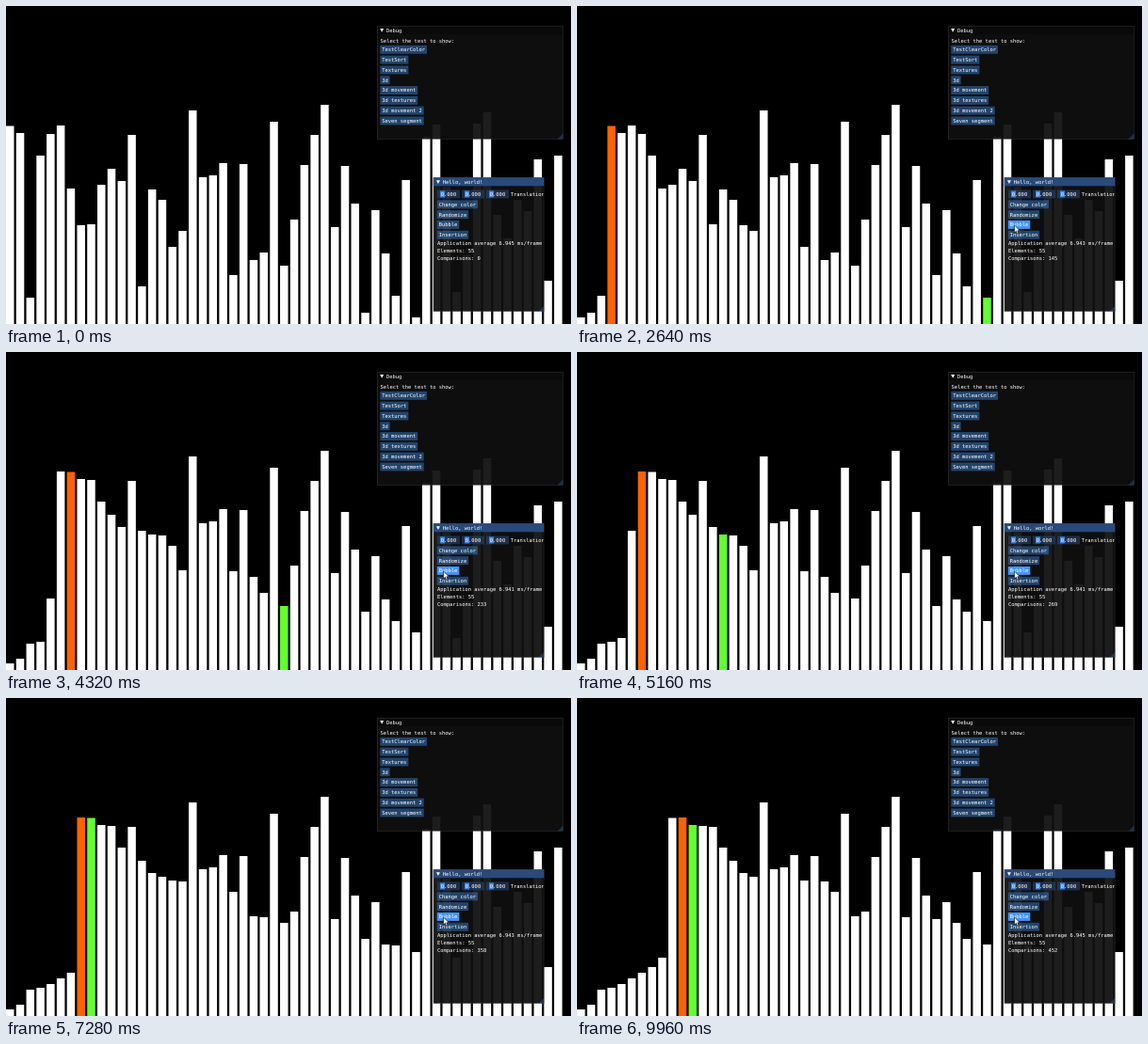
Recreate the animation shown at these times as an HTML page. Size 600 by 338 pixels, loop 10000 ms.

```html
<!DOCTYPE html>
<html lang="en">
<head>
<meta charset="utf-8">
<title>Sort visualiser</title>
<style>
  html, body { margin: 0; width: 100%; height: 100%; overflow: hidden; background: #000; }
  svg { display: block; width: 600px; height: 338px; }
  text {
    font: 5.45px "DejaVu Sans Mono", "Liberation Mono", monospace;
    fill: #fff; white-space: pre; text-rendering: geometricPrecision;
  }
</style>
</head>
<body>
<svg id="stage" viewBox="0 0 600 338">
  <defs><clipPath id="clip"><rect x="454" y="182" width="116.5" height="142"/></clipPath></defs>
  <g id="bars"></g>
  <g id="frames"></g>
  <g id="debug"></g>
  <g id="panel" clip-path="url(#clip)"></g>
  <path id="cursor" d="M0 0V8L1.9 6.3L3.1 9.2L4.5 8.6L3.3 5.8H5.8Z" fill="#fff" stroke="#000" stroke-width=".6"/>
</svg>
<script>
const LOOP = 10000, FLOOR = 338, PITCH = 10.78, BAR = 8.5;
const CHAR = 3.28, ROW = 10.8, LINE = 8;
const WHITE = '#fff', ORANGE = '#ff6200', GREEN = '#62ff2e', BLUE = '#4296fa', NAVY = '#294a7a';
const SWAP_TIME = 65, PASS_TIME = 30, SORT_START = 1125;

// The unsorted input: top edge of each bar
const tops = [
  127.5, 135, 310, 159, 136, 127, 194, 233, 232, 190, 173, 186, 137, 298, 195, 206, 256, 239,
  111, 182, 180, 167, 286, 168, 270, 262, 123, 276, 227, 169, 137, 105, 235, 170, 210, 326,
  217, 263, 308, 185, 331, 139, 126, 192, 304, 265, 125, 113, 222, 247, 206, 218, 163, 292, 159
];

const $ = id => document.getElementById(id);

function add(parent, tag, attrs, content) {
  const el = document.createElementNS('http://www.w3.org/2000/svg', tag);
  for (const k in attrs) el.setAttribute(k, attrs[k]);
  if (content) el.textContent = content;
  parent.appendChild(el);
  return el;
}

const rect = (g, x, y, width, height, fill, opacity = 1) =>
  add(g, 'rect', { x, y, width, height, fill, 'fill-opacity': opacity });

// Text placed by the middle of its line
const label = (g, x, mid, s) => add(g, 'text', { x, y: mid + 1.9 }, s);

function button(g, x, mid, s) {
  const box = rect(g, x, mid - 4.4, s.length * CHAR + 3.8, 8.9, BLUE, .4);
  label(g, x + 1.9, mid, s);
  return { box, mid };
}

const buttonColumn = (g, x, mid, names) => names.map((s, i) => button(g, x, mid + i * ROW, s));

function windowFrame(x, y, w, h, title, titleFill) {
  const g = $('frames');
  rect(g, x, y, w, h, '#0f0f0f', .94);
  rect(g, x, y, w, 9, titleFill);
  add(g, 'path', { d: `M${x + 3.2} ${y + 3}h3.9l-1.95 3.7z`, fill: WHITE });
  label(g, x + 10, y + 4.8, title);
  add(g, 'path', { d: `M${x + w} ${y + h}v-6l-6 6z`, fill: BLUE, 'fill-opacity': .25 });
  add(g, 'rect', {
    x: x + .25, y: y + .25, width: w - .5, height: h - .5,
    fill: 'none', stroke: '#6e6e80', 'stroke-opacity': .4, 'stroke-width': .5
  });
}

const bars = tops.map((y, i) => rect($('bars'), i * PITCH, y, BAR, FLOOR - y, WHITE));

const debug = $('debug');
windowFrame(394, 21, 197.5, 120.5, 'Debug', '#0a0a0a');
label(debug, 397.6, 37, 'Select the test to show:');
buttonColumn(debug, 397.3, 46.3, [
  'TestClearColor', 'TestSort', 'Textures', '3d', '3d movement', '3d textures', '3d movement 2', 'Seven segment'
]);

const panel = $('panel');
windowFrame(453.8, 182.3, 117.5, 142.4, 'Hello, world!', NAVY);
for (let i = 0; i < 3; i++) {
  const x = 458 + i * 26;
  rect(panel, x, 195.5, 24, 8.9, NAVY, .54);
  rect(panel, x + 3, 196.4, 5, 7, '#3d85e0');
  label(panel, x + 3.8, 200, '0.000');
}
label(panel, 535.8, 200, 'Translation');
const buttons = buttonColumn(panel, 457.8, 210.8, ['Change color', 'Randomize', 'Bubble', 'Insertion']);
const [average, , counter] = [' ', 'Elements: ' + tops.length, ' ']
  .map((s, i) => label(panel, 458, 252.5 + i * LINE, s));

// Exchange sort: the picture pauses only before each swap.
function record() {
  const a = [...tops], steps = [{ t: 0, a: [...a], start: -1, probe: -1, count: 0 }];
  let count = 0, t = SORT_START;
  for (let i = 0; t < LOOP; i++, t += PASS_TIME) {
    let start = i;
    for (let j = i + 1; j < a.length; j++) {
      count++;
      if (a[j] <= a[i]) continue;
      steps.push({ t, a: [...a], start, probe: j, count });
      if (start === i) start = j;
      [a[i], a[j]] = [a[j], a[i]];
      t += SWAP_TIME;
    }
  }
  return steps;
}

const steps = record();

function drawBars({ a, start, probe }) {
  bars.forEach((bar, i) => {
    bar.setAttribute('y', a[i]);
    bar.setAttribute('height', FLOOR - a[i]);
    bar.setAttribute('fill', i === probe ? GREEN : i === start ? ORANGE : WHITE);
  });
}

// The pointer glides from the lower right to the Bubble button.
function drawPointer(t) {
  const u = Math.min(Math.max((t - 40) / 840, 0), 1);
  const left = (1 - u) ** 2;
  const x = 464.5 + 120 * left, y = 233 + 79 * left;
  $('cursor').style.display = u > 0 ? '' : 'none';
  $('cursor').setAttribute('transform', `translate(${x} ${y})`);
  for (const { box, mid } of buttons) {
    const over = x < 457.8 + box.width.baseVal.value && Math.abs(y - mid) < 4.5;
    box.setAttribute('fill-opacity', over ? 1 : .4);
  }
}

function draw(t) {
  const step = steps.findLast(s => s.t <= t);
  const ms = 6.943 + .002 * Math.cos(2 * Math.PI * t / LOOP);
  drawBars(step);
  drawPointer(t);
  counter.textContent = 'Comparisons: ' + step.count;
  average.textContent = `Application average ${ms.toFixed(3)} ms/frame (144.0 FPS)`;
}

const begin = performance.now();
function tick() {
  draw((performance.now() - begin) % LOOP);
  requestAnimationFrame(tick);
}
tick();
</script>
</body>
</html>
```
